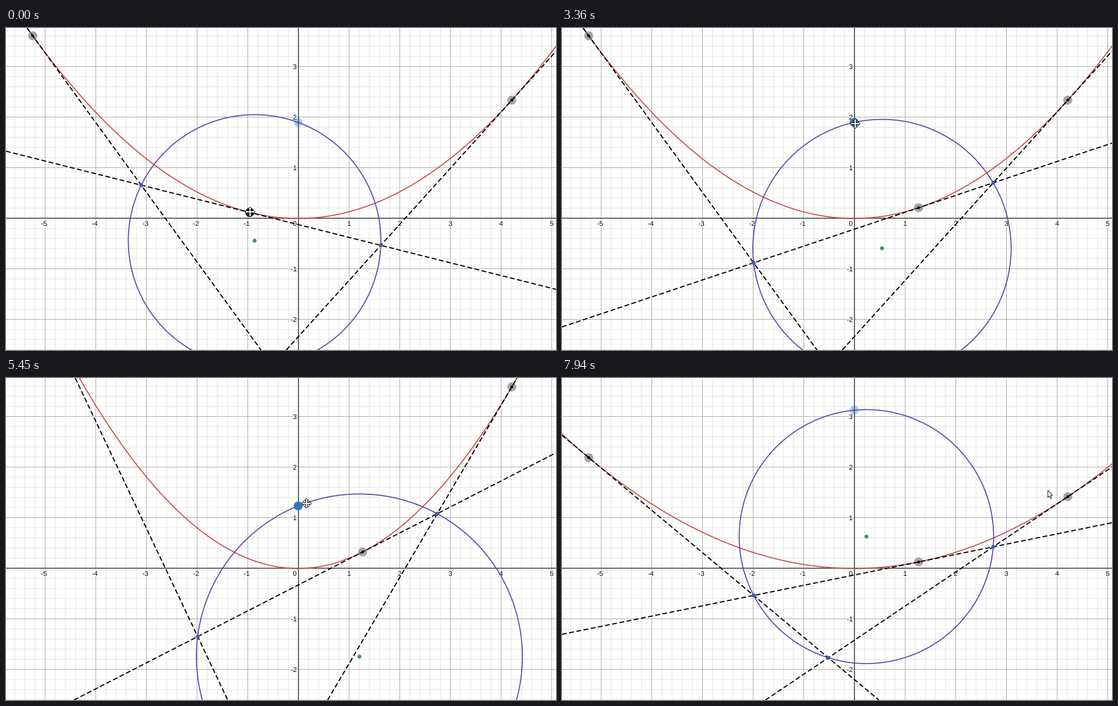
These frames come from a looping animation (977 by 573 pixels, 8 s). A matplotlib script:

```python
import itertools
import numpy as np
import matplotlib.pyplot as plt
from matplotlib.animation import FuncAnimation
from matplotlib.collections import LineCollection
from matplotlib.patches import Circle, Polygon
from matplotlib.patheffects import withStroke

W, H, DPI = 977, 573, 64
PX = 72 / DPI                 # one pixel in points
OX, OY, UNIT = 519, 339, 90   # origin and scale of the graph
GX, GY = OX + 0.5, OY - 0.5   # grid lines sit on whole pixels
LOOP, STEP = 8000, 20

RED, BLUE, GREEN, PURPLE = "#c74440", "#2d70b3", "#388c46", "#6042a6"
LEFT, RIGHT = -5.239, 4.217   # fixed tangent points
RELEASE, HOVER, PRESS, DROP = 2320, 3230, 3360, 7270


def progress(t, start, end):
    return min(max((t - start) / (end - start), 0), 1)


def ease(t, start, end):
    u = progress(t, start, end)
    return u ** 3 * (10 - 15 * u + 6 * u * u)


def mix(a, b, u):
    return a + (b - a) * u


def held(t):
    """Start of the 130 ms step that is showing at time t."""
    base = max(b for b in (0, 500, 3760, 7420) if b <= t)
    return base + (t - base) // 130 * 130 if base else 0


def middle_at(t):
    return mix(-0.956, 1.272, ease(t, 480, 2380))


def focus_at(t):
    lowered = mix(1.9, 1.238, ease(t, 3630, 4930))
    return mix(lowered, 3.13, 1 - (1 - progress(t, 5450, DROP)) ** 1.33)


def pointer_at(t):
    """The mouse drags one handle, then the other, then leaves."""
    spot = 433.5 + 327j
    for start, end, goal in ((365, 2350, 635 + 217j), (2450, 3400, 521 + 170j),
                             (3600, 4700, 534 + 223j), (5450, DROP, 584 + 61j),
                             (7290, 7940, 863 + 200j)):
        spot = mix(spot, goal, ease(t, start, end))
    return spot


def to_px(x, y):
    return OX + UNIT * x, OY - UNIT * y


def outline(points):
    return np.column_stack([points.real, points.imag])


fig = plt.figure(figsize=(W / DPI, H / DPI), dpi=DPI, facecolor="white")
ax = fig.add_axes([0, 0, 1, 1])
ax.set_xlim(0, W)
ax.set_ylim(H, 0)
ax.axis("off")


def rules(offsets, color, width):
    segs = [[(GX + d, 0), (GX + d, H)] for d in offsets]
    segs += [[(0, GY + d), (W, GY + d)] for d in offsets]
    lines = LineCollection(segs, colors=color, linewidths=width * PX, zorder=1)
    lines.set_snap(False)
    ax.add_collection(lines)


def label(text, x, y, ha):
    ax.text(x, y + 4.5, text, ha=ha, va="baseline", fontsize=12 * PX,
            family="Liberation Sans", color="black", zorder=2,
            path_effects=[withStroke(linewidth=3 * PX, foreground="white")])


def stroke(color, z, width=1.9, **kw):
    return ax.plot([], [], color=color, lw=width * PX, zorder=z, **kw)[0]


def disc(color, r, z, alpha=1.0):
    return ax.add_patch(Circle((0, 0), r, fc=color, ec="none", alpha=alpha, zorder=z))


def mouse(shape):
    return ax.add_patch(Polygon(outline(shape), closed=True, fc="white",
                                ec="black", lw=0.9 * PX, zorder=9))


class Handle:
    """Draggable point: a dot in a pale halo, solid while held."""

    def __init__(self, color):
        self.halo = disc(color, 8, 6)
        self.dot = disc(color, 2.5, 7)

    def place(self, pos, solid):
        self.halo.center = self.dot.center = pos
        self.halo.set_alpha(0.92 if solid else 0.34)


rules(np.arange(-32, 29) * UNIT / 5, "#e4e4e4", 1)
rules(np.arange(-5, 6) * UNIT, "#a9a9a9", 1)
rules([0], "#2b2b2b", 1.5)

label("0", GX - 6.5, GY + 9, "center")
for n in range(1, 6):
    label(f"{n}", GX + UNIT * n, GY + 9, "center")
    label(f"-{n}", GX - UNIT * n - 2, GY + 9, "center")
for n in (-2, -1, 1, 2, 3):
    label(f"{n}", GX - 3, GY - UNIT * n, "right")

X = np.linspace(-5.9, 5.2, 240)
curve = stroke(RED, 3, alpha=0.92)
ring = ax.add_patch(Circle((0, 0), 1, fill=False, ec=PURPLE, lw=1.9 * PX,
                           alpha=0.95, zorder=4))
tangents = [stroke("black", 5, 2, ls=(0, (4.3, 2.2)), dash_capstyle="butt")
            for _ in range(3)]
corners = [disc("#3a5fb0", 3.5, 6) for _ in range(3)]
center = disc(GREEN, 3.5, 6, 0.92)
handles = [Handle("black") for _ in range(3)]
focus_handle = Handle(BLUE)

# Mouse shapes as complex points; the cross is one arm turned four times
arm = np.array([-1.5 - 1.5j, -1.5 - 5j, -4 - 5j, -8.5j, 4 - 5j, 1.5 - 5j])
cross_shape = np.concatenate([arm * 1j ** k for k in range(4)])
arrow_shape = np.array([0, 12.5j, 2.8 + 9.9j, 4.8 + 14.5j,
                        6.7 + 13.6j, 4.8 + 9.2j, 8.4 + 9.2j])
cross, arrow = mouse(cross_shape), mouse(arrow_shape)


def tangent_span(p, f):
    """Ends of the tangent at x = p, cut to the stage."""
    m, c = p / (2 * f), -p * p / (4 * f)
    lo, hi = -OX / UNIT, (W - OX) / UNIT
    if abs(m) > 1e-6:
        ends = sorted([(OY / UNIT - c) / m, ((OY - H) / UNIT - c) / m])
        lo, hi = max(lo, ends[0]), min(hi, ends[1])
    xs = np.array([lo, hi])
    return to_px(xs, m * xs + c)


def draw(i):
    t = held(i * STEP + STEP // 2)
    f = focus_at(t)
    touch = [LEFT, middle_at(t), RIGHT]

    curve.set_data(*to_px(X, X * X / (4 * f)))
    for k, (p, line, handle) in enumerate(zip(touch, tangents, handles)):
        line.set_data(*tangent_span(p, f))
        handle.place(to_px(p, p * p / (4 * f)), k == 1 and t < RELEASE)
    for (p, q), dot in zip(itertools.combinations(touch, 2), corners):
        dot.center = to_px((p + q) / 2, p * q / (4 * f))

    # Circle through the three corners, which also meets the focus
    u, v, w = (p / (2 * f) for p in touch)
    cx = f / 2 * (u + v + w - u * v * w)
    cy = f / 2 * (1 + u * v + v * w + w * u)
    ring.center = center.center = to_px(cx, cy)
    ring.set_radius(UNIT * np.hypot(cx, cy - f))
    focus_handle.place(to_px(0, f), PRESS <= t < DROP)

    spot = pointer_at(t)
    free = RELEASE <= t < HOVER or t >= DROP
    arrow.set_visible(free)
    cross.set_visible(not free)
    arrow.set_xy(outline(arrow_shape + spot))
    cross.set_xy(outline(cross_shape + spot))
    return []


anim = FuncAnimation(fig, draw, frames=LOOP // STEP, interval=STEP,
                     init_func=lambda: draw(0), repeat=True, repeat_delay=0)
plt.show()
```
